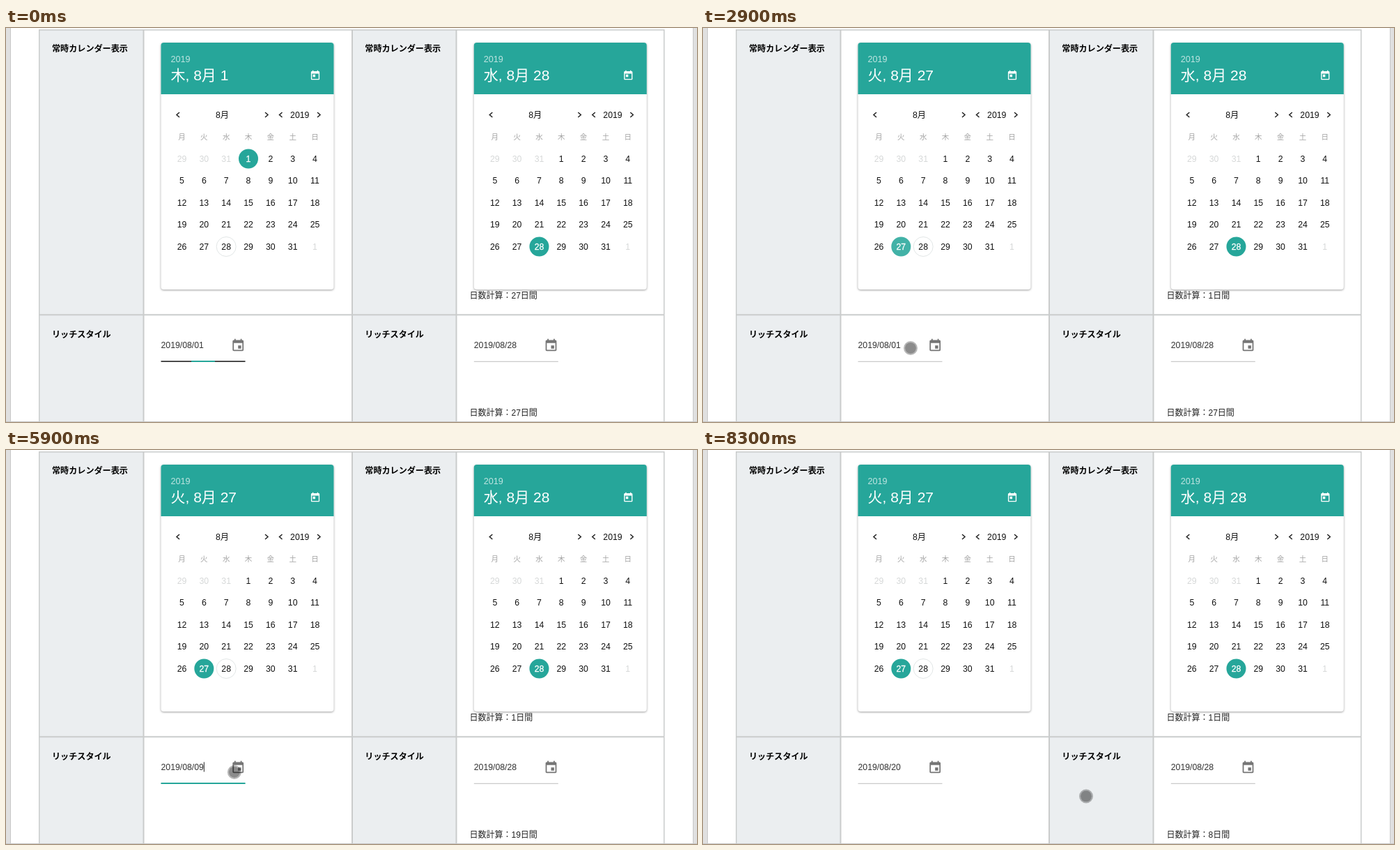
An HTML page that plays this animation: 992x565 px, repeating every 8500 ms.

```html
<!DOCTYPE html>
<html lang="ja">
<head>
<meta charset="utf-8">
<title>日数計算カレンダー</title>
<style>
html, body { margin: 0; width: 100%; height: 100%; overflow: hidden; background: #fff; }
svg { display: block; width: 100%; height: 100%; }
text { font: 12.25px "Liberation Sans", "Noto Sans CJK JP", "Noto Sans CJK", sans-serif; fill: #111; white-space: pre; }
.mid { text-anchor: middle; }
.label { font-size: 12.1px; font-weight: bold; fill: #000; }
.year { font-size: 12.6px; fill: #fff; fill-opacity: .7; }
.title { font-size: 21px; fill: #fff; }
.week { font-size: 10.5px; fill: #a4a4a4; }
.off { fill: #d6d8d8; }
.on { fill: #fff; stroke: #fff; stroke-width: .3; }
.sum { font-size: 12px; fill: #222; }
.date { fill: #333; }
.card { fill: #fff; filter: drop-shadow(0 1px 1.5px rgba(0,0,0,.38)); }
.arrow { fill: none; stroke: #222; stroke-width: 1.5; }
</style>
</head>
<body>
<svg id="stage" viewBox="0 0 992 565"></svg>
<script>
const TEAL = '#26a69a';
const LOOP = 8500, STEP = 100;
const SHIFT = 449.3;
const WEEK = '月火水木金土日';
const BOX = 'M16 1v2H8V1H6v2H5c-1.1 0-2 .9-2 2v14c0 1.1.9 2 2 2h14c1.1 0 2-.9 2-2V5c0-1.1-.9-2-2-2h-1V1zm3 18H5V8h14z';

// [time, value] lists: the latest value holds
const mainDay = [[0, 1], [600, 2], [1200, 3], [1800, 15], [2300, 27]];
const popDay = [[0, 9], [6900, 20]];
const dateText = [[0, '01'], [4000, '0'], [4600, '07'], [5200, '0'], [5600, '09'], [6900, '20']];
const clicks = [600, 1200, 1700, 2300, 3000, 6000, 6900, 7500];
const path = [
  [200, 362, 330], [600, 383, 192], [900, 383, 192], [1200, 414, 191], [1300, 414, 191],
  [1700, 354, 252], [1900, 355, 252], [2300, 286, 316], [2400, 286, 318], [2700, 291, 429],
  [2900, 298, 459], [3100, 300, 460], [3500, 313, 479], [5700, 313, 479], [6000, 333, 456],
  [6100, 333, 456], [6500, 317, 523], [6800, 271, 505], [7000, 271, 505], [7400, 466, 495],
  [7600, 467, 495], [8100, 483, 496.5], [8300, 550, 496.5]
];

const clamp = x => Math.max(0, Math.min(1, x));
const ease = x => x * x * (3 - 2 * x);
const ramp = (t, from, length) => clamp((t - from) / length);
const latest = (list, t) => list.filter(k => k[0] <= t).pop();

const text = (x, y, s, cls) => `<text x="${x}" y="${y}" class="${cls}">${s}</text>`;
const rect = (x, y, w, h, fill) => `<rect x="${x}" y="${y}" width="${w}" height="${h}" fill="${fill}"/>`;
const move = (x, y, s) => `<g transform="translate(${x} ${y})">${s}</g>`;
const arrow = (x, d) => `<path class="arrow" d="M${x - 2 * d} 121l${4 * d} 3.5l${-4 * d} 3.5"/>`;

function icon(x, y, scale, fill, mark) {
  return `<path transform="translate(${x} ${y}) scale(${scale}) translate(-12 -11)" fill="${fill}" fill-rule="evenodd" d="${BOX}${mark}"/>`;
}

function calendar(day, glow, popup) {
  const x = popup ? 222.8 : 222.5, w = popup ? 250.5 : 248;
  let s = `<rect class="card" x="${x}" y="21" width="${w}" height="354" rx="4"/>`;
  s += `<path fill="${TEAL}" d="M${x} 95V25q0-4 4-4h${w - 8}q4 0 4 4v70z"/>`;
  s += text(236.5, 49, '2019', 'year');
  s += text(236.5, 75, `${WEEK[(day + 2) % 7]}, 8月 ${day}`, 'title');
  if (!popup) s += icon(444, 67.5, .68, '#fff', 'M7 10h5v5H7z');
  s += arrow(247, -1) + arrow(374, 1) + arrow(394.5, -1) + arrow(449, 1);
  s += text(310.5, 129, '8月', 'mid') + text(421.7, 129, '2019', 'mid');
  for (let i = 0; i < 35; i++) {
    const cx = 252.5 + 31.83 * (i % 7), cy = 187.5 + 31.5 * Math.floor(i / 7);
    const n = i - 2, inside = n > 0 && n < 32;
    const label = n < 1 ? n + 31 : n > 31 ? n - 31 : n;
    const picked = n === day;
    if (i < 7) s += text(cx, 160, WEEK[i], 'mid week');
    if (picked) s += `<circle cx="${cx}" cy="${cy}" r="14" fill="${TEAL}" opacity="${glow}"/>`;
    else if (n === 28) s += `<circle cx="${cx}" cy="${cy}" r="14" fill="none" stroke="#e2e6e6"/>`;
    s += text(cx, cy + 4.4, label, 'mid ' + (picked ? 'on' : inside ? '' : 'off'));
  }
  return s;
}

// a fresh pick is pale, and stays a little pale until focus leaves it
function glowOf(t, start, leave) {
  return .7 + .17 * ramp(t, start + 100, 400) + .13 * ramp(t, leave, 300);
}

function field(date, dark, teal) {
  let s = text(222.5, 459, date, 'date') + icon(333.2, 454.4, .875, '#757575', 'M12 12h5v5h-5z');
  s += dark ? rect(222.5, 477.3, 121, 1.6, '#222') : rect(222.5, 477.8, 121, 1, '#bdbdbd');
  if (teal > 0) s += rect(283 - 60.5 * teal, 477, 121 * teal, 2, TEAL);
  return s;
}

function table() {
  let s = rect(0, 0, 6, 565, '#e0e0e0') + rect(6, 0, 1, 565, '#c8c8c8');
  s += rect(987, 0, 5, 565, '#e0e0e0') + rect(986, 0, 1, 565, '#c8c8c8');
  s += rect(48, 3, 149, 562, '#ebeef0') + rect(497, 3, 149, 562, '#ebeef0');
  for (const x of [47, 196.5, 496, 645.5, 944]) s += rect(x, 2, x === 47 || x === 944 ? 1.5 : 2, 563, '#cacccc');
  s += rect(47, 2, 898, 1.5, '#cacccc') + rect(47, 410.3, 898, 2, '#cacccc');
  for (const x of [66, 66 + SHIFT]) {
    s += text(x, 34, '常時カレンダー表示', 'label') + text(x, 443.5, 'リッチスタイル', 'label');
  }
  return s + rect(0, 564, 992, 1, '#c8c8c8');
}

function pointer(t) {
  if (t < path[0][0]) return '';
  const i = path.findIndex(p => p[0] > t);
  let [, x, y] = path[path.length - 1];
  if (i > 0) {
    const a = path[i - 1], b = path[i], k = ease((t - a[0]) / (b[0] - a[0]));
    x = a[1] + (b[1] - a[1]) * k;
    y = a[2] + (b[2] - a[2]) * k;
  }
  const down = clicks.some(c => t >= c && t < c + 150);
  const [fill, ring] = down ? ['rgba(190,180,30,.8)', 'rgba(215,208,80,.8)'] : ['rgba(0,0,0,.45)', 'rgba(0,0,0,.28)'];
  return `<circle cx="${x}" cy="${y}" r="8" fill="${fill}"/><circle cx="${x}" cy="${y}" r="9" fill="none" stroke="${ring}" stroke-width="2"/>`;
}

const backdrop = table() + move(SHIFT, 0, calendar(28, 1, false) + field('2019/08/28', false, 0));

function scene(t) {
  const [pickedAt, day] = latest(mainDay, t);
  const dd = latest(dateText, t)[1];
  const glow = pickedAt ? glowOf(t, pickedAt, day === 27 ? 3000 : LOOP) : 1;
  const teal = t < 100 ? .28 : t < 6000 ? ease(ramp(t, 2950, 250)) : 0;

  let s = backdrop + move(0, 0, calendar(day, glow, false)) + field('2019/08/' + dd, t < 100, teal);
  if (t >= 3100 && t < 6000 && (t - 3600) % 1000 < 500) {
    s += rect(222.5 + 6.81 * dd.length + 47.7, 447.5, 1, 14, '#222');
  }
  s += text(665.5, 388, `日数計算：${28 - day}日間`, 'sum');
  s += text(665.5, 556, '日数計算：' + (dd.length < 2 ? '入力してください' : `${28 - dd}日間`), 'sum');

  const open = ramp(t, 5950, 250) * (1 - ramp(t, 7550, 200));
  if (open > 0) {
    const [at, pick] = latest(popDay, t);
    const body = rect(222.8, 350, 250.5, 30, '#fff');
    s += `<g opacity="${open}">${move(-15.3, 221.4, calendar(pick, at ? glowOf(t, at, LOOP) : 1, true) + body)}</g>`;
  }
  return s + pointer(t);
}

const stage = document.getElementById('stage');
let shown = -1;

function draw(now) {
  const t = Math.floor((now % LOOP) / STEP) * STEP;
  if (t !== shown) {
    shown = t;
    stage.innerHTML = scene(t);
  }
  requestAnimationFrame(() => draw(performance.now()));
}
draw(performance.now());
</script>
</body>
</html>
```
